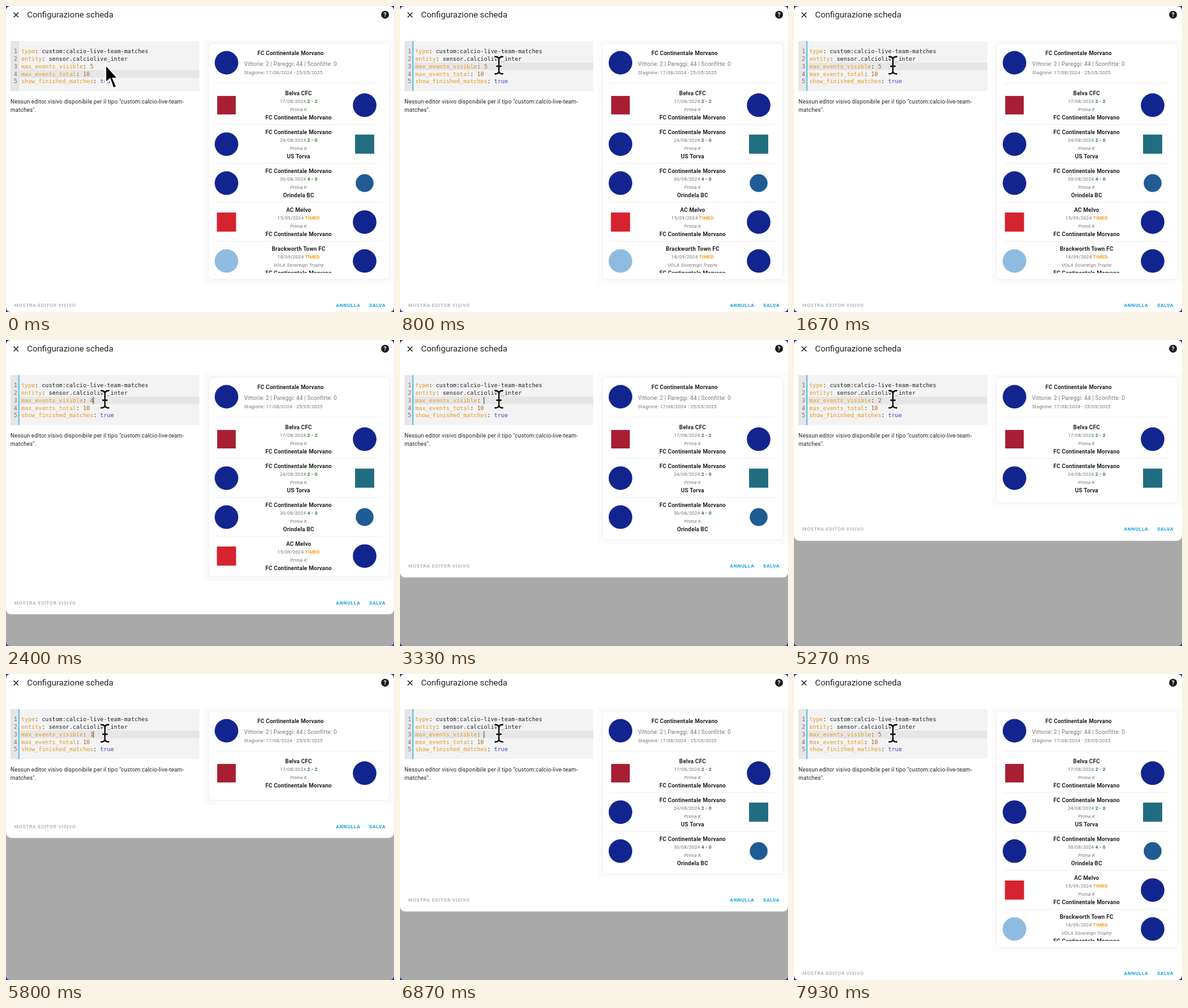
Write an HTML page that moves like this. It is 608 px wide and 480 px high and loops after 8 s.

```html
<!DOCTYPE html>
<html lang="it">
<head>
<meta charset="utf-8">
<title>Configurazione scheda</title>
<style>
  html, body { margin: 0; width: 100%; height: 100%; overflow: hidden; background: #24289c; }
  svg { display: block; width: 608px; height: 480px; }
  text { font-family: Roboto, sans-serif; font-size: 8.8px; letter-spacing: .018em; fill: #222; white-space: pre; }
  .title { font-size: 13.3px; letter-spacing: 0; }
  .note { font-size: 8.75px; }
  .code { font-family: "DejaVu Sans Mono", monospace; font-size: 8.94px; letter-spacing: 0; }
  .key { fill: #e79a25; }
  .number { fill: #b8621b; }
  .bool { fill: #3a45c8; }
  .gutter { fill: #777; text-anchor: end; }
  .bold { font-weight: 700; }
  .mid { text-anchor: middle; }
  .grey { fill: #777; }
  .small { font-size: 7.5px; }
  .italic { font-style: italic; }
  .score { fill: #2e7d32; font-weight: 700; }
  .timed { fill: #f5a01d; font-weight: 700; }
  .button { font-size: 7.5px; font-weight: 700; letter-spacing: .089em; fill: #12a2dd; }
  .off { font-weight: 500; fill: #aaa; }
  .divider { stroke: #ececec; stroke-width: .8; }
</style>
</head>
<body>
<svg viewBox="0 0 608 480">
  <defs>
    <clipPath id="window"><rect width="608" height="480" rx="6"/></clipPath>
    <clipPath id="listClip"><rect id="listBox" x="318" y="122" width="282" height="297"/></clipPath>
    <path id="beam" d="M149 79.500Q155 79.500 155 84V102Q155 106.500 149 106.500M161 79.500Q155 79.500 155 84M155 102Q155 106.500 161 106.500M151.500 94.500H158.500"/>
  </defs>
  <rect width="608" height="480" fill="#24289c"/>
  <g clip-path="url(#window)">
    <rect width="608" height="480" fill="#a9a9a9"/>
    <rect id="dialog" width="608" height="480" rx="8" fill="#fff"/>

    <path d="M12 10.300L19.500 17.800M19.500 10.300L12 17.800" stroke="#222" stroke-width="1.400"/>
    <text class="title" x="33" y="18.300">Configurazione scheda</text>
    <circle cx="594" cy="13.700" r="6.200" fill="#1c1c1c"/>
    <text class="bold mid" x="594" y="17" style="fill:#fff">?</text>

    <rect x="7" y="55" width="296" height="78.500" fill="#f3f3f3"/>
    <rect x="7" y="55" width="13" height="78.500" fill="#e6e6e6"/>
    <rect id="activeLine" x="7" width="296" height="11.900" fill="#e6e6e6"/>
    <rect id="gutterEdge" x="19.300" y="55" height="78.500"/>
    <g id="code"></g>
    <rect id="caret" y="89.500" width="1" height="10.800" fill="#444"/>

    <text class="note" x="7" y="153">Nessun editor visivo disponibile per il tipo "custom:calcio-live-team-</text>
    <text class="note" x="7" y="165.500">matches".</text>

    <rect id="panel" x="310" y="52" width="298" fill="#fbfbfb"/>
    <rect id="card" x="317" y="58" width="284" rx="7" fill="#fff" stroke="#ededed"/>
    <g id="header"></g>
    <g id="list" clip-path="url(#listClip)"></g>

    <g id="footer">
      <text class="button off" x="13" y="2.700">MOSTRA EDITOR VISIVO</text>
      <text class="button" x="517" y="2.700">ANNULLA</text>
      <text class="button" x="569" y="2.700">SALVA</text>
    </g>

    <path id="arrow" d="M156 92V120.500L162.700 114.500L168 129L173.500 126.700L167.700 113.500H175.500Z" fill="#000" stroke="#fff" stroke-width="2.200"/>
    <g id="textCursor" fill="none" stroke-linecap="round">
      <use href="#beam" stroke="#fff" stroke-width="5"/>
      <use href="#beam" stroke="#111" stroke-width="2.300"/>
    </g>
  </g>
</svg>
<script>
const LOOP = 8000, CHAR = 5.382, CODE_X = 24, LINE = 11.87, ROW = 61.1;
const CLICK = 600, CURSOR_SWAP = 130;
const $ = id => document.getElementById(id);
const set = (id, attrs) => Object.entries(attrs).forEach(([k, v]) => $(id).setAttribute(k, v));
const show = (id, on) => set(id, { display: on ? 'inline' : 'none' });
const text = (x, y, cls, body, id = '') => `<text x="${x}" y="${y}" class="${cls}" id="${id}">${body}</text>`;
const span = (cls, body) => `<tspan class="${cls}">${body}</tspan>`;

const CLUB = 'FC Continentale Morvano';
const crests = {
  [CLUB]: ['circle', '#12258f', 18.5],
  'Belva CFC': ['square', '#a81e32', 14.5],
  'US Torva': ['square', '#216d80', 15],
  'Orindela BC': ['circle', '#1f5c94', 14],
  'AC Melvo': ['square', '#d5232f', 15],
  'Brackworth Town FC': ['circle', '#8fbbe0', 18.5]
};
const matches = [
  ['Belva CFC', CLUB, '17/08/2024', '2 - 2'],
  [CLUB, 'US Torva', '24/08/2024', '2 - 0'],
  [CLUB, 'Orindela BC', '30/08/2024', '4 - 0'],
  ['AC Melvo', CLUB, '15/09/2024', 'TIMED'],
  ['Brackworth Town FC', CLUB, '18/09/2024', 'TIMED', 'VOLA Sovereign Trophy']
];
const codeLines = [
  ['type', 'custom:calcio-live-team-matches'],
  ['entity', 'sensor.calciolive_inter'],
  ['max_events_visible', ''],
  ['max_events_total', '10', 'number'],
  ['show_finished_matches', 'true', 'bool']
];
// [time, typed value]; an empty field shows three matches
const edits = [
  [0, '5'], [1000, '5'], [1900, ''], [2200, '4'], [3000, ''], [3700, '3'],
  [4400, ''], [4600, '2'], [5430, ''], [5700, '1'], [6600, ''], [7100, '5']
];

function crest(name, x, y) {
  const [shape, color, r] = crests[name];
  return shape === 'circle'
    ? `<circle cx="${x}" cy="${y}" r="${r}" fill="${color}"/>`
    : `<rect x="${x - r}" y="${y - r}" width="${2 * r}" height="${2 * r}" fill="${color}"/>`;
}
const divider = y => `<path class="divider" d="M329 ${y}H589"/>`;

function matchRow([home, away, date, result, league = 'Prima K'], i) {
  const y = 136.6 + ROW * i;
  const kind = result === 'TIMED' ? 'timed' : 'score';
  return (i ? divider(y - 11.8) : '') +
    crest(home, 345.5, y + 19) + crest(away, 562, y + 19) +
    text(458.5, y + 3.1, 'bold mid', home) +
    text(458.5, y + 15.4, 'small grey mid', `${date} ${span(kind, result)}`) +
    text(458.5, y + 28.2, 'small grey italic mid', league) +
    text(458.5, y + 41.4, 'bold mid', away);
}

$('code').innerHTML = codeLines.map(([key, value, kind = ''], i) => {
  const y = 74 + LINE * i;
  return text(17.5, y, 'code gutter', i + 1) +
    text(CODE_X, y, 'code', `${span('key', key)}: ${span(kind, value)}`);
}).join('') + text(CODE_X + 20 * CHAR, 74 + 2 * LINE, 'code number', '5', 'value');

$('header').innerHTML = crest(CLUB, 345.5, 89) +
  text(446, 76.7, 'bold mid', CLUB) +
  text(373, 94.4, 'grey', 'Vittorie: 2 | Pareggi: 44 | Sconfitte: 0') +
  text(373, 106.8, 'small grey', 'Stagione: 17/08/2024 - 25/05/2025') +
  divider(121);
$('list').innerHTML = matches.map((m, i) => `<g>${matchRow(m, i)}</g>`).join('');
const rows = [...$('list').children];

function showCount(n) {
  const grow = 57.7 * n, bottom = 140.6 + grow;
  set('dialog', { height: Math.min(480, 199.5 + grow) });
  set('panel', { height: bottom + 6.5 - 52 });
  set('card', { height: bottom - 58 });
  set('listBox', { height: bottom - 10.3 - 122 });
  set('footer', { transform: `translate(0 ${181.4 + 57.6 * n})` });
  rows.forEach((row, i) => row.setAttribute('display', i < n ? 'inline' : 'none'));
}

function draw(now) {
  const t = now % LOOP;
  const [since, value] = edits.filter(([start]) => start <= t).pop();
  const focused = t >= CLICK;
  showCount(value === '' ? 3 : +value);
  $('value').textContent = value;
  set('activeLine', { y: 65 + LINE * (focused ? 2 : 3) });
  set('gutterEdge', focused ? { width: 1.9, fill: '#58bfe9' } : { width: 0.8, fill: '#dcdcdc' });
  set('caret', { x: CODE_X + (20 + value.length) * CHAR - 0.5 });
  show('caret', focused && (t - since) % 1200 < 600);
  show('arrow', t < CURSOR_SWAP);
  show('textCursor', t >= CURSOR_SWAP);
}

const start = performance.now();
function tick() {
  draw(performance.now() - start);
  requestAnimationFrame(tick);
}
tick();
</script>
</body>
</html>
```
